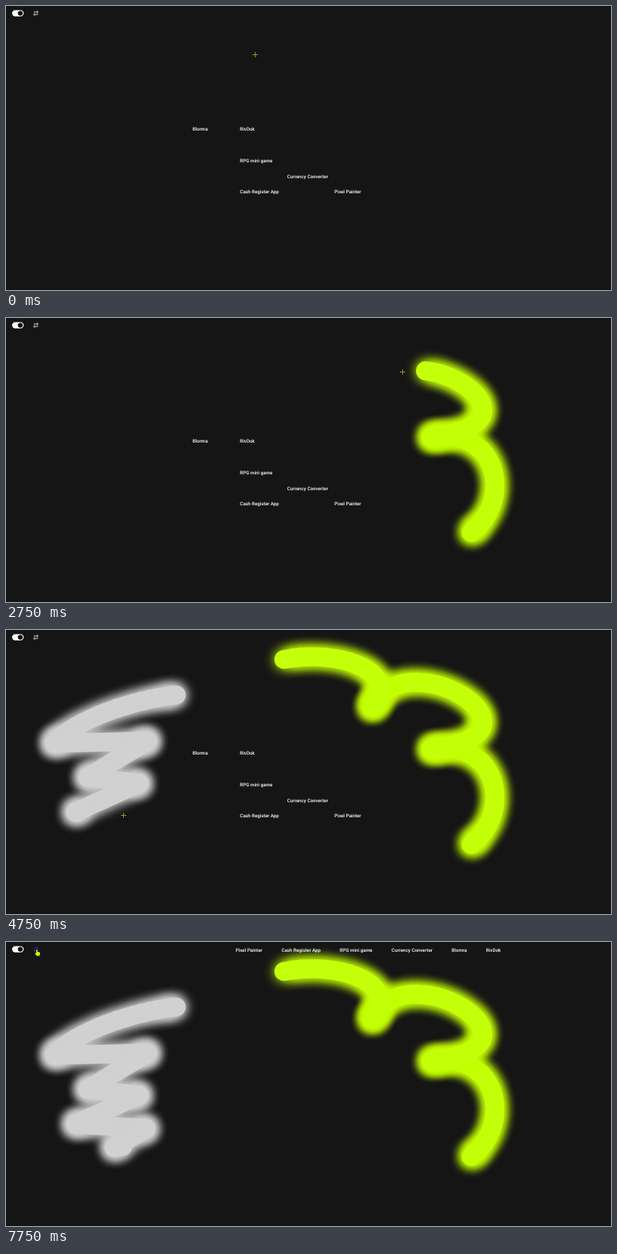
Recreate the animation shown at these times as an HTML page with a canvas. Size 800x376 px, loop 8000 ms.

```html
<!DOCTYPE html>
<html lang="en">
<head>
<meta charset="utf-8">
<title>Glow brush</title>
<style>
  html, body { margin: 0; width: 100%; height: 100%; overflow: hidden; background: #151515; }
  canvas, svg { position: absolute; left: 0; top: 0; }
  text { fill: #fff; font: 500 6.25px Roboto, sans-serif; text-rendering: geometricPrecision; }
</style>
</head>
<body>
<canvas id="paint" width="800" height="376"></canvas>
<svg width="800" height="376" fill="none">
  <rect x="8" y="5.4" width="15.4" height="8.4" rx="4.2" fill="#fff"/>
  <circle cx="18.9" cy="9.6" r="3.2" fill="#111"/>
  <path id="swap" stroke="#fff" stroke-width=".8"
    d="M36.6 8h5.8M40.8 6.3 42.5 8 40.8 9.7M42.5 11.2h-5.8M38.3 9.5 36.6 11.2 38.3 12.9"/>
  <g id="labels"></g>
  <path id="cross" stroke="#939a1c" d="M-3 .5h7M.5-3v7"/>
  <path id="hand" fill="#d9fb00"
    d="M-1.5-4q.8-.8 1.5 0v2.4l2.8.7q.8.3.7 1.2l-.6 3.4h-4L-3.2.8q0-1 1-.7l.7.6z"/>
</svg>
<script>
const LOOP = 8000, FRAME = 250 / 3, LAST_FRAME = 93;
const MENU_TIME = 7745;    // labels jump to the top bar
const STEP = 8, LAG = 25;  // brush sampling and delay behind the pointer, ms

const clamp = (v, lo, hi) => Math.min(hi, Math.max(lo, v));
const ease = u => u * u * (3 - 2 * u);
const $ = id => document.getElementById(id);

// The pointer makes one eased Bezier sweep after another and slows at every turn
const sweeps = [];
let here = [329, 64], clock = 0;

function sweep(ms, to, c1 = here, c2 = to) {
  sweeps.push({ start: clock, ms, points: [here, c1, c2, to] });
  here = to;
  clock += ms;
}

// Straight sweeps whose duration follows from their length
function zigzag(corners) {
  for (const to of corners)
    sweep(27 + 0.6 * Math.hypot(to[0] - here[0], to[1] - here[1]), to);
}

const strokes = [];
const brushDown = (color, delay = 0) => strokes.push({ color, start: clock + delay, drawn: 0 });
const brushUp = delay => {
  const s = strokes.at(-1);
  s.steps = Math.floor((clock + delay - s.start) / STEP);
};

sweep(2080, [571, 293], [620, 80], [640, 300]);
sweep(110, [615, 284]);

brushDown('#c4ff0b');
sweep(290, [562, 158], [672, 240], [650, 143]);
sweep(375, [484, 102], [735, 138], [530, 10]);
sweep(300, [300, 66], [535, 45], [390, 5]);
brushUp(-86);

sweep(1028, [226, 86], [88, 110], [88, 110]);

brushDown('#d1d1d1', 8);
sweep(185, [64, 150], [180, 90], [95, 115]);
zigzag([[187, 147], [108, 195], [176, 203], [92, 241], [185, 247], [143, 272], [205, 264]]);
brushUp(-38);

sweep(900, [118, 185], [230, 250]);
sweep(6670 - clock, [25, 28]);
sweep(830, [41.5, 14.5], [8, 5], [20, 5]);

function pointer(t) {
  const { start, ms, points: [a, b, c, d] } = sweeps.findLast(s => s.start <= t);
  const u = ease(clamp((t - start) / ms, 0, 1)), v = 1 - u;
  return [0, 1].map(i =>
    v * v * v * a[i] + 3 * v * v * u * b[i] + 3 * v * u * u * c[i] + u * u * u * d[i]);
}

const ctx = $('paint').getContext('2d');
ctx.lineCap = 'round';
ctx.lineWidth = 25;
ctx.shadowBlur = 16;

// Each short segment brings its own glow, so slow turns grow thicker
function paint(t) {
  const targets = strokes.map(s =>
    clamp(Math.floor((t - LAG - s.start) / STEP), 0, s.steps));
  if (strokes.some((s, i) => targets[i] < s.drawn)) {
    ctx.clearRect(0, 0, 800, 376);
    strokes.forEach(s => s.drawn = 0);
  }
  strokes.forEach((s, i) => {
    ctx.strokeStyle = ctx.shadowColor = s.color;
    for (; s.drawn < targets[i]; s.drawn++) {
      const from = s.start + s.drawn * STEP;
      ctx.beginPath();
      ctx.moveTo(...pointer(from));
      ctx.lineTo(...pointer(from + STEP));
      ctx.stroke();
    }
  });
}

// Text with its grid column and row, in menu order
const labels = [
  ['Pixel Painter', 3, 4], ['Cash Register App', 1, 4], ['RPG mini game', 1, 2],
  ['Currency Converter', 2, 3], ['Blomra', 0, 0], ['RivDok', 1, 0]
].map(([text, column, row]) => {
  const el = document.createElementNS('http://www.w3.org/2000/svg', 'text');
  el.textContent = text;
  $('labels').append(el);
  return { el, x: 246.8 + column * 62.5, y: 165.1 + row * 20.8 };
});

function placeLabels(menu) {
  let menuX = 303.7;
  for (const { el, x, y } of labels) {
    el.setAttribute('x', menu ? menuX : x);
    el.setAttribute('y', menu ? 12.5 : y);
    if (menu) menuX += el.getComputedTextLength() + 25.4;
  }
}

function render(t) {
  paint(t);
  placeLabels(t >= MENU_TIME);

  const [x, y] = pointer(t);
  const hover = x < 48 && y < 18;
  $('cross').style.display = hover ? 'none' : '';
  $('hand').style.display = hover ? '' : 'none';
  $('cross').setAttribute('transform', `translate(${Math.round(x)} ${Math.round(y)})`);
  $('hand').setAttribute('transform', `translate(${x} ${y})`);
  $('swap').setAttribute('stroke', hover && x > 34 ? '#3a2fc8' : '#fff');
}

function tick() {
  const frame = Math.floor((performance.now() % LOOP + 4) / FRAME);
  render(Math.min(frame, LAST_FRAME) * FRAME);
  requestAnimationFrame(tick);
}
tick();
</script>
</body>
</html>
```
